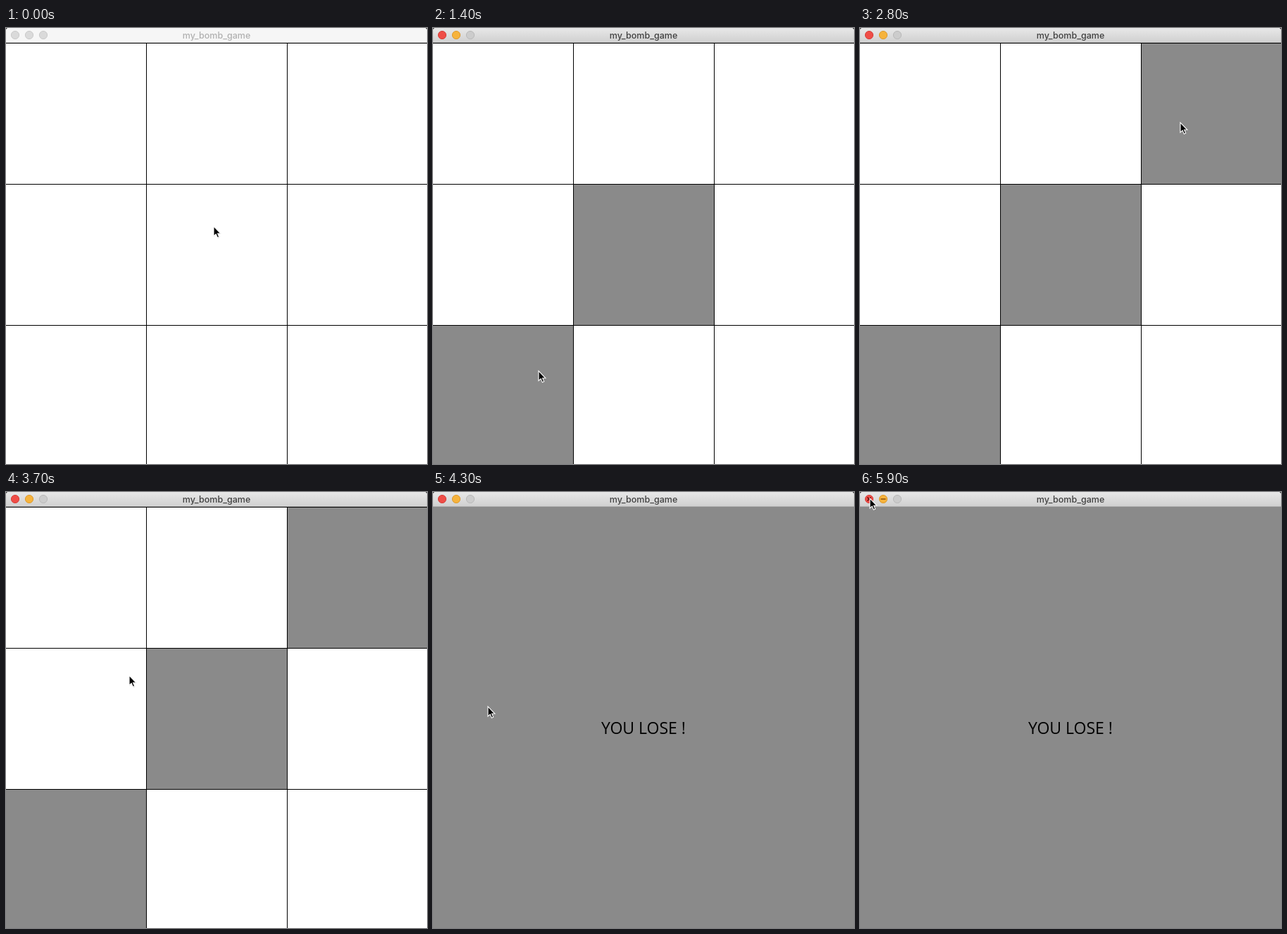
These frames come from a looping animation (598x618 px, 6.1 s). An HTML page:

```html
<!DOCTYPE html>
<html lang="en">
<head>
<meta charset="utf-8">
<title>my_bomb_game</title>
<style>
  html, body { margin: 0; width: 100%; height: 100%; overflow: hidden; background: #fff; }
  svg { display: block; width: 598px; height: 618px; }
  .title { font: 500 12.5px Inter, Roboto, sans-serif; text-anchor: middle; }
  .result { font: 23px "Open Sans", "Noto Sans", sans-serif; }
</style>
</head>
<body>
<svg viewBox="0 0 598 618">
  <defs>
    <linearGradient id="barFill" x2="0" y2="1">
      <stop stop-color="#e8e8e8"/><stop offset="1" stop-color="#cfcfcf"/>
    </linearGradient>
    <radialGradient id="shine" gradientUnits="userSpaceOnUse" cx="79" cy="321" r="59">
      <stop stop-color="#686868"/><stop offset=".5" stop-color="#3c3c3c"/><stop offset="1" stop-color="#000"/>
    </radialGradient>
    <radialGradient id="spark">
      <stop stop-color="#fbe83c"/><stop offset=".45" stop-color="#f2cd3c"/><stop offset="1" stop-color="#dd922f"/>
    </radialGradient>
  </defs>

  <g id="board">
    <rect width="598" height="618" fill="#fff"/>
    <g fill="#8a8a8a">
      <rect id="centre" x="200" y="222" width="199" height="199"/>
      <rect id="corner" x="0" y="422" width="199" height="196"/>
      <rect id="far" x="400" y="22" width="198" height="199"/>
    </g>
    <path d="M0 21.5H598M0 221.5H598M0 421.5H598M199.5 21V618M399.5 21V618" stroke="#000"/>
    <g id="bomb">
      <rect y="221" width="199" height="200" fill="#f4f4f4"/>
      <ellipse cx="66" cy="339" rx="60" ry="68.5"/>
      <ellipse cx="73" cy="332" rx="50" ry="57" fill="url(#shine)"/>
      <g transform="rotate(42 104.5 284.5)" fill="#fff" stroke="#000" stroke-width="1.3">
        <ellipse cx="104.5" cy="286" rx="15" ry="6"/>
        <ellipse cx="104.5" cy="283.5" rx="14.5" ry="5.5"/>
      </g>
      <path d="M105 284Q132 254 153 257" fill="none" stroke="#8f6d2f" stroke-width="5.5"/>
      <path d="M105 283Q132 253 153 256" fill="none" stroke="#a17c39" stroke-width="3"/>
      <polygon id="star" fill="url(#spark)" stroke="#d98b35"/>
    </g>
  </g>

  <g id="lose">
    <rect width="598" height="618" fill="#8a8a8a"/>
    <text class="result" x="239" y="342.5">YOU LOSE !</text>
  </g>

  <rect id="bar" width="598" height="21"/>
  <path id="edge" d="M0 20.5H598"/>
  <path d="M0 0H2L0 2ZM598 0H596L598 2Z" fill="#333"/>
  <g id="lights"></g>
  <g id="glyphs" fill="none" stroke-width="1.5">
    <path d="M10.5 7.5L15.5 12.5M15.5 7.5L10.5 12.5" stroke="#5c0d0a"/>
    <path d="M29.5 10H36.5" stroke="#8a4d08"/>
  </g>
  <text id="title" class="title" x="299" y="15">my_bomb_game</text>

  <g id="cursor">
    <path d="M0 1V15L3.4 12 5.7 17.2 8.5 16 6.3 11H11Z" opacity=".2"/>
    <path d="M0 0V14L3.2 11.1 5.4 16.2 7.7 15.2 5.6 10.3H9.9Z" stroke="#fff" stroke-width="1.1"/>
  </g>
</svg>
<script>
  const LOOP = 6100, TICK = 100;
  const $ = id => document.getElementById(id);

  // [start, end, x, y]: travel to x, y between the two times
  const START = [295, 281];
  const MOVES = [
    [700, 1100, 150, 486],
    [1700, 2400, 443, 136],
    [2400, 2500, 455, 134],
    [3300, 3900, 77, 304],
    [4000, 4100, 78, 304],
    [4700, 5400, 18, 36],
    [5400, 5900, 14, 9]
  ];
  // [id, from, to]
  const SHOWN = [
    ["centre", 300, LOOP], ["corner", 1400, LOOP], ["far", 2800, LOOP],
    ["bomb", 4200, 4300], ["lose", 4300, LOOP], ["glyphs", 5500, LOOP]
  ];
  const LIGHTS = [["#ef4d47", "#d63f3a"], ["#f6b33c", "#dd9a2e"], ["#cccccc", "#b9b9b9"]];

  const ease = p => p * p * (3 - 2 * p);

  function cursorAt(t) {
    let [x, y] = START;
    for (const [from, to, nx, ny] of MOVES) {
      if (t <= from) break;
      const p = ease(Math.min(1, (t - from) / (to - from)));
      x += (nx - x) * p;
      y += (ny - y) * p;
    }
    return [Math.round(x), Math.round(y)];
  }

  function starPoints(cx, cy, tips) {
    return Array.from({ length: tips * 2 }, (_, i) => {
      const a = Math.PI * i / tips - Math.PI / 2 - 0.04;
      const r = i % 2 ? 16.5 : i % 4 ? 26 : 29.5;
      return [cx + r * Math.cos(a) * 0.9, cy + r * Math.sin(a)].map(n => n.toFixed(1)).join();
    }).join(" ");
  }

  $("star").setAttribute("points", starPoints(164.5, 264, 12));
  $("lights").innerHTML = LIGHTS.map((_, i) => `<circle cx="${13 + 20 * i}" cy="10" r="5.6"/>`).join("");
  const dots = [...$("lights").children];

  function paint(el, fill, stroke) {
    el.setAttribute("fill", fill);
    el.setAttribute("stroke", stroke);
  }

  function draw(now) {
    const t = Math.floor((now % LOOP) / TICK) * TICK;
    const active = t >= 300;
    for (const [id, from, to] of SHOWN) $(id).style.display = t >= from && t < to ? "" : "none";
    $("bar").setAttribute("fill", active ? "url(#barFill)" : "#f6f6f6");
    $("edge").setAttribute("stroke", active ? "#b4b4b4" : "#d8d8d8");
    $("title").setAttribute("fill", active ? "#404040" : "#b0b0b0");
    dots.forEach((dot, i) => paint(dot, ...(active ? LIGHTS[i] : ["#dadada", "#cacaca"])));
    $("cursor").setAttribute("transform", `translate(${cursorAt(t)})`);
  }

  const begin = performance.now();
  function loop() {
    draw(performance.now() - begin);
    requestAnimationFrame(loop);
  }
  loop();
</script>
</body>
</html>
```
